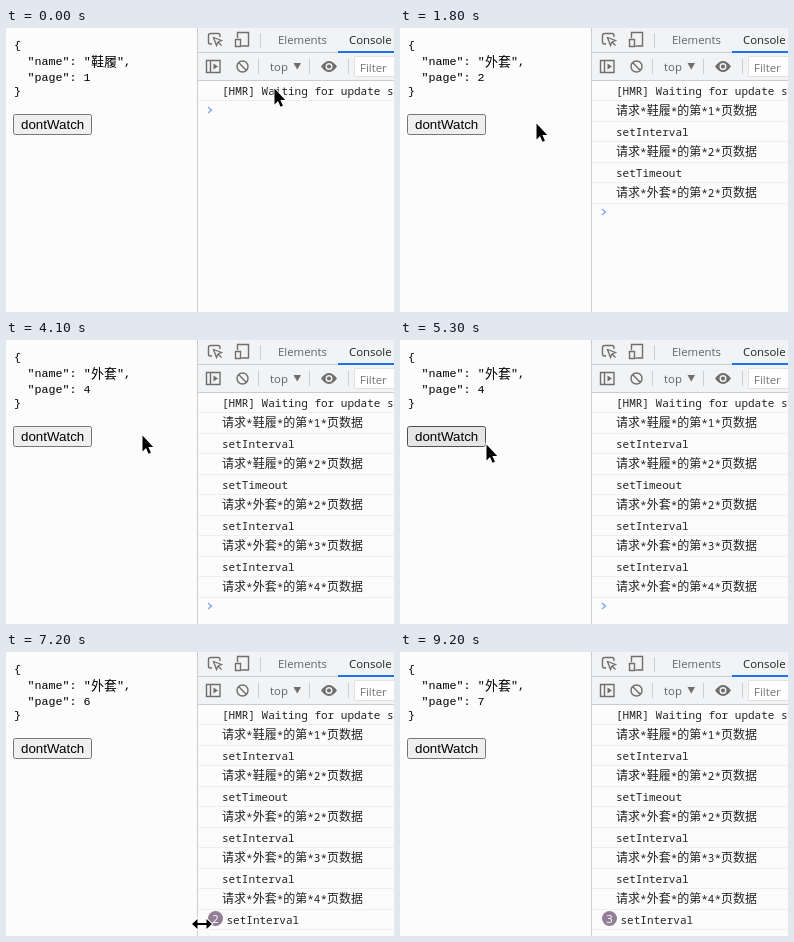
Write an HTML page that moves like this. It is 388 by 284 pixels and loops after 9.5 s.

```html
<!DOCTYPE html>
<html lang="zh">
<head>
<meta charset="utf-8">
<style>
html, body { margin: 0; width: 100%; height: 100%; overflow: hidden; background: #fcfcfc }
svg { display: block }
text { white-space: pre }
.pre { font: 11.7px "Liberation Mono", monospace; fill: #000 }
.cjk { font: 13px "Noto Sans CJK SC", "Noto Sans CJK", sans-serif; fill: #000 }
.log { font: 11px "Noto Sans Mono", "Noto Sans CJK SC", "Noto Sans CJK", monospace; fill: #222 }
.log tspan { font: 12px "Noto Sans CJK SC", "Noto Sans CJK", sans-serif }
.ui { font: 11.4px "Open Sans", sans-serif; fill: #5f6368 }
.btn { font: 13.33px "Liberation Sans", Arial, sans-serif; fill: #000 }
.icon { fill: none; stroke: #6e6e6e; stroke-width: 1.4 }
.sep { stroke: #cacdd1 }
#cursor { stroke: #fff; stroke-width: 2; paint-order: stroke }
</style>
</head>
<body>
<svg width="388" height="284" viewBox="0 0 388 284">
  <!-- devtools chrome -->
  <path d="M192 0H388V52H192Z" fill="#f1f3f4"/>
  <path class="sep" d="M191.5 0V284M192 24.5H388M192 52.5H388M254.5 5V20M252.5 31V46M303.5 31V46M342.5 31V46"/>
  <path d="M332 23H388V25H332Z" fill="#1a73e8"/>
  <g class="icon">
    <path d="M206 16H204.5Q202.5 16 202.5 14V7.5Q202.5 5.5 204.5 5.5H212Q214 5.5 214 7.5V9"/>
    <path d="M207.5 9.5L215.5 12.5L212 14L210.5 17.5ZM212 14L215.5 17.5" stroke-width="1.3"/>
    <path d="M231.5 10V4.5H242.5V18H235.5M229.5 11.500H234.5V18.5H229.5Z"/>
    <path d="M200.5 32.5H214V44.5H200.5ZM204.5 32.5V44.5"/>
    <path d="M207.5 35.5L212 38.5L207.5 41.5Z" fill="#6e6e6e" stroke="none"/>
    <circle cx="236.5" cy="38.5" r="5.5"/>
    <path d="M232.6 34.6L240.4 42.4"/>
  </g>
  <path d="M315 38.5Q323 27.5 331 38.5Q323 49.5 315 38.500Z" fill="#6e6e6e"/>
  <circle cx="323" cy="38.5" r="2.8" fill="#6e6e6e" stroke="#f1f3f4" stroke-width="1.4"/>
  <path d="M287.5 35H295L291.25 41.5Z" fill="#6e6e6e"/>
  <path d="M390 28.5H348.5V48.5H390" fill="#fff" stroke="#e0e2e5"/>
  <text class="ui" x="272" y="16">Elements</text>
  <text class="ui" x="343" y="16" style="fill:#222">Console</text>
  <text class="ui" x="264" y="43">top</text>
  <text class="ui" x="354" y="44" style="fill:#757575">Filter</text>
  <!-- page -->
  <g class="pre">
    <text x="8" y="21">{</text>
    <text x="7.5" y="37">  "name": "</text>
    <text x="111" y="37">",</text>
    <text x="7.5" y="53">  "page": </text>
    <text x="8" y="67">}</text>
  </g>
  <text id="name" class="cjk" x="85" y="38"></text>
  <text id="page" class="pre" x="77.5" y="53"></text>
  <rect id="button" x="7.5" y="86.5" width="78" height="20" rx="2"/>
  <text class="btn" x="15" y="101">dontWatch</text>
  <g id="logs"></g>
  <g id="cursor"></g>
</svg>
<script>
const LOOP = 9500, ROW = 20.5;
const $ = id => document.getElementById(id);

const request = (name, page) => `请求*${name}*的第*${page}*页数据`;
const logs = [
  [0, '[HMR] Waiting for update signal'],
  [100, request('鞋履', 1)],
  [1400, 'setInterval'], [1400, request('鞋履', 2)],
  [1800, 'setTimeout'], [1800, request('外套', 2)],
  [2700, 'setInterval'], [2700, request('外套', 3)],
  [4100, 'setInterval'], [4100, request('外套', 4)],
  [5500, 'setInterval']
];
const ticks = [1300, 2700, 4100, 5500, 6900, 8200];
const repeats = ticks.slice(3);

// time, x, y, shape
const moves = [
  [0, 268, 60, 'arrow'], [100, 214, 78, 'arrow'], [200, 152, 92, 'arrow'], [300, 136, 95, 'arrow'],
  [4400, 133, 103, 'arrow'], [4500, 120, 115, 'arrow'], [4600, 103, 116, 'arrow'],
  [4700, 88, 110, 'arrow'], [4800, 82, 103, 'arrow'], [5300, 86, 104, 'arrow'],
  [5400, 124, 158, 'arrow'], [5500, 170, 214, 'arrow'],
  [6600, 172, 220, 'arrow'], [6700, 176, 230, 'arrow'], [6800, 182, 242, 'arrow'],
  [6900, 192, 251, 'resize'], [7000, 196, 253, 'resize'], [7100, 196, 263, 'resize'],
  [7200, 196, 272, 'resize'], [7800, 188, 277, 'resize'], [7900, 0, 0, 'none'],
  [8600, 187, 274, 'resize'], [8700, 197, 251, 'resize'], [8800, 226, 206, 'arrow'],
  [8900, 264, 160, 'arrow'], [9000, 312, 118, 'arrow'], [9100, 366, 84, 'arrow'], [9200, 0, 0, 'none']
];
const shapes = {
  arrow: 'M.5 .5V16.500L4 13L6.500 18.800L8.900 17.800L6.400 12H11.200Z',
  resize: 'M-10 0L-4.500 -5V-1H4.500V-5L10 0L4.500 5V1H-4.500V5Z',
  none: ''
};

const cjk = s => s.replace(/[\u4e00-\u9fff]+/g, '<tspan>$&</tspan>');
const countPast = (times, t) => times.filter(at => at <= t).length;

function drawLogs(t) {
  const rows = logs.filter(([at]) => at <= t);
  const count = countPast(repeats, t);
  let out = '';
  rows.forEach(([, text], i) => {
    const y = Math.floor(i * ROW), badge = i === 10 && count > 1;
    out += `<path d="M192 ${Math.round(72 + i * ROW) + .5}H388" stroke="#efefef"/>
      <text class="log" x="${badge ? 220.5 : 216}" y="${67 + y}">${cjk(text)}</text>`;
    if (badge) out += `<circle cx="209.5" cy="${61.5 + y}" r="7.5" fill="#927f97"/>
      <text class="ui" x="209.5" y="${65.5 + y}" text-anchor="middle" style="fill:#fff">${count}</text>`;
  });
  const y = 82 + Math.floor((rows.length - 1) * ROW);
  return out + `<path d="M202 ${y - 3}l3.500 3l-3.500 3" fill="none" stroke="#7da7ee" stroke-width="1.4"/>`;
}

function draw(t) {
  $('name').textContent = t < 1800 ? '鞋履' : '外套';
  $('page').textContent = 1 + countPast(ticks, t);
  const hover = t >= 4700 && t < 5400;
  $('button').setAttribute('fill', hover ? '#e5e5e5' : '#efefef');
  $('button').setAttribute('stroke', hover ? '#4f4f4f' : '#767676');
  $('logs').innerHTML = drawLogs(t);
  const [, x, y, shape] = moves.findLast(([at]) => at <= t);
  $('cursor').innerHTML = `<path transform="translate(${x} ${y})" d="${shapes[shape]}"/>`;
}

const start = performance.now();
let last = -1;
function frame() {
  const t = Math.floor((performance.now() - start) % LOOP / 100) * 100;
  if (t !== last) draw(last = t);
  requestAnimationFrame(frame);
}
frame();
</script>
</body>
</html>
```
